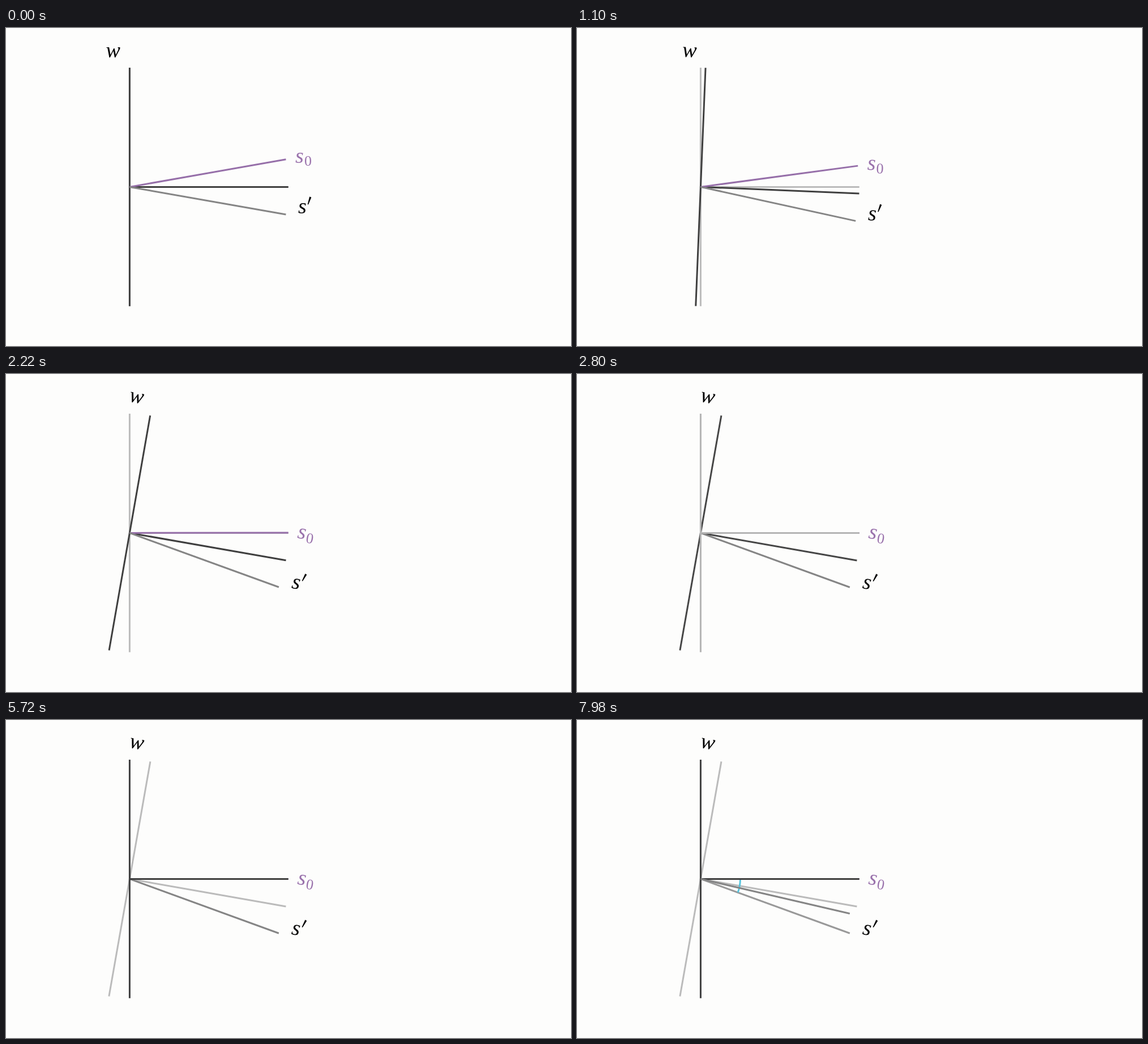
Animation, 998 px wide and 561 px high, one loop 8 s. Source, as an HTML page:

```html
<!DOCTYPE html>
<html lang="en">
<head>
<meta charset="utf-8">
<title>Rotating basis</title>
<style>
  html, body { margin: 0; width: 100%; height: 100%; overflow: hidden; background: #fdfdfc; }
  svg { display: block; width: 100%; height: 100%; }
  line, path { stroke-width: 3; fill: none; }
  text { font: italic 38px "Liberation Serif", serif; }
  .sub { font: 26px "Liberation Serif", serif; }
  .purple { fill: #9a72ac; }
</style>
</head>
<body>
<svg viewBox="0 0 998 561">
  <defs>
    <g id="axes">
      <line y1="-210.3" y2="210.3"/>
      <line x2="280.3"/>
    </g>
  </defs>
  <g transform="translate(218.4 280.4)">
    <use id="back" href="#axes" stroke="#bbb"/>
    <g id="basis">
      <use id="turned" href="#axes"/>
      <line x2="280.3" transform="rotate(-10)" stroke="#966fa9"/>
      <line id="sPrime" x2="280.3" transform="rotate(10)"/>
      <text x="-42" y="-228">w</text>
      <text class="purple" x="292.5" y="-42.5">s</text>
      <text class="purple sub" x="308.5" y="-37">0</text>
      <text x="297.5" y="46.5">s</text>
      <polygon points="317.8,17.2 321,18.4 315.7,31.2 314.3,30.7"/>
    </g>
    <path id="arc" stroke="#58c4dd"/>
    <use id="front" href="#axes"/>
    <line id="projection" stroke="#858585"/>
  </g>
</svg>
<script>
  const LOOP = 8000, DARK = 63, MID = 133, LIGHT = 187;
  const el = id => document.getElementById(id);
  const [back, basis, turned, sPrime, arc, front, projection] =
    ["back", "basis", "turned", "sPrime", "arc", "front", "projection"].map(el);

  // Quintic ease from 0 to 1
  const ease = (time, start, length) => {
    const t = Math.min(1, Math.max(0, (time - start) / length));
    return t ** 3 * (10 - 15 * t + 6 * t * t);
  };
  const mix = (a, b, p) => a + (b - a) * p;
  const stroke = (node, a, b, p) => {
    const v = Math.round(mix(a, b, p));
    node.setAttribute("stroke", `rgb(${v},${v},${v})`);
  };
  const show = (node, on) => node.setAttribute("visibility", on ? "visible" : "hidden");
  const polar = (r, degrees) => {
    const a = degrees * Math.PI / 180;
    return [r * Math.cos(a), r * Math.sin(a)];
  };

  function draw(time) {
    const swap = ease(time, 2400, 2000);
    const sweep = ease(time, 6555, 1000);
    const drop = ease(time, 7555, 1000);

    basis.setAttribute("transform", `rotate(${10 * ease(time, 400, 2000)})`);
    stroke(turned, DARK, LIGHT, swap);
    stroke(front, LIGHT, DARK, swap);
    stroke(sPrime, MID, LIGHT, drop);
    show(back, time < 2400);
    show(front, time >= 2400);

    show(arc, sweep > 0);
    arc.setAttribute("d", `M${polar(70, 1.2)}A70 70 0 0 1 ${polar(70, mix(1.2, 20, sweep))}`);

    const [x, y] = polar(280.3, 20);
    show(projection, drop > 0);
    projection.setAttribute("x2", x);
    projection.setAttribute("y2", mix(y, 0, drop));
  }

  const origin = performance.now();
  function tick() {
    draw((performance.now() - origin) % LOOP);
    requestAnimationFrame(tick);
  }
  tick();
</script>
</body>
</html>
```
